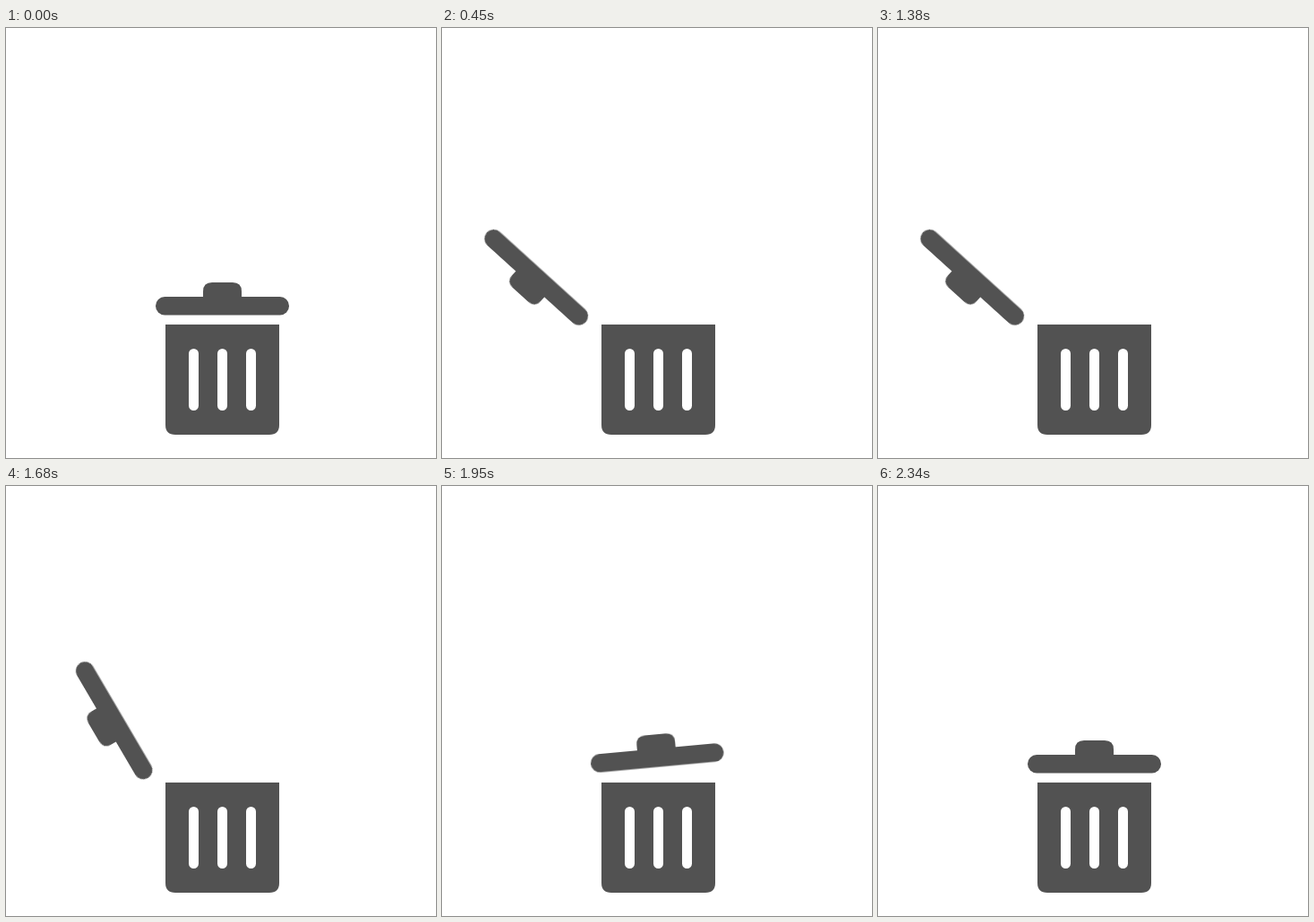
These frames come from a looping animation (480x480 px, 2730 ms). An HTML page:

```html
<!DOCTYPE html>
<html lang="en">
<head>
<meta charset="utf-8">
<title>Trash bin</title>
<style>
  html, body { margin: 0; width: 100%; height: 100%; overflow: hidden; background: #fff; }
  svg { display: block; width: 100%; height: 100%; fill: #525252; }
  .slot { fill: none; stroke: #fff; stroke-width: 11; stroke-linecap: round; }

  /* The lid hinges on its lower left corner. */
  .lid {
    transform-origin: 167.2px 320.6px;
    animation: lid 2730ms infinite;
  }
  @keyframes lid {
    0%, 1.099% { transform: rotate(0deg); animation-timing-function: ease-in-out; }
    16.6% { transform: rotate(-137.8deg); animation-timing-function: linear; }
    58.242% { transform: rotate(-137.8deg); animation-timing-function: cubic-bezier(.37, 0, .63, 1); }
    72.344% { transform: rotate(-4deg); animation-timing-function: cubic-bezier(.37, 0, .63, 1); }
    79.121% { transform: rotate(-48.3deg); animation-timing-function: cubic-bezier(.37, 0, .63, 1); }
    85.714%, 100% { transform: rotate(0deg); }
  }
</style>
</head>
<body>
<svg viewBox="0 0 480 480">
  <path d="M178 331H305V443Q305 454 294 454H189Q178 454 178 443Z"/>
  <path class="slot" d="M209.5 363.5V421.5M241.5 363.5V421.5M273.5 363.5V421.5"/>
  <g class="lid">
    <rect x="167" y="300" width="149" height="20.4" rx="10.2"/>
    <path d="M220 305V294Q220 284 230 284H253Q263 284 263 294V305Z"/>
  </g>
</svg>
</body>
</html>
```
